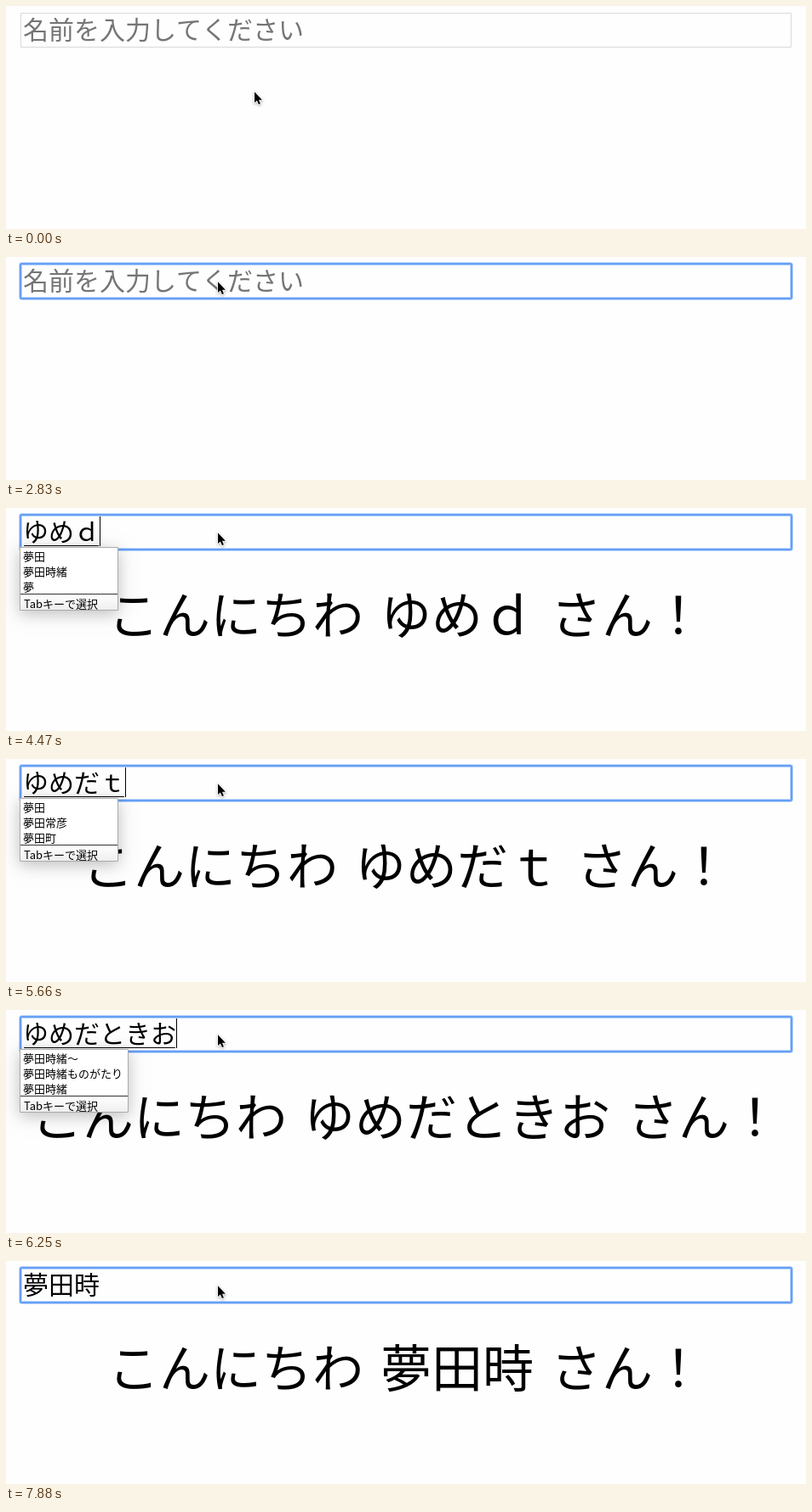
Recreate the animation shown at these times as an HTML page with a canvas. Size 940 by 263 pixels, loop 8 s.

```html
<!DOCTYPE html>
<html lang="ja">
<head>
<meta charset="utf-8">
<style>
html, body { margin: 0; width: 940px; height: 263px; overflow: hidden; background: #fefefe; }
canvas { display: block; }
</style>
</head>
<body>
<canvas id="stage" width="940" height="263"></canvas>
<script>
const ctx = document.getElementById('stage').getContext('2d');
const LOOP = 8000;
const FAMILY = '"Noto Sans CJK JP", "Noto Sans CJK", sans-serif';

// [start time, field text, suggestions]
const typing = [
  [0, ''],
  [3270, 'ｙ'],
  [3420, 'ゆ', ['ゆ']],
  [4170, 'ゆめ', ['夢', '夢田', '夢']],
  [4470, 'ゆめｄ', ['夢田', '夢田時緒', '夢']],
  [4620, 'ゆめだ', ['夢田', '夢田時緒', '夢田町']],
  [5660, 'ゆめだｔ', ['夢田', '夢田常彦', '夢田町']],
  [5810, 'ゆめだと', ['夢田', '夢田時緒', '夢田町']],
  [5960, 'ゆめだとｋ', ['夢田時緒', '夢田時', '夢田']],
  [6100, 'ゆめだとき', ['夢田時緒', '夢田時', '夢田']],
  [6250, 'ゆめだときお', ['夢田時緒〜', '夢田時緒ものがたり', '夢田時緒']],
  [6400, '夢田時緒'],
  [7880, '夢田時']
];
const FOCUS = 1330, COMMIT = 6990;
const caretToggles = [1330, 1780, 2230, 2830, 3270, 4020, 4170, 5070, 5510, 6400, 6990, 7440];
const moveTimes = [290, 440, 590, 740, 890];

const passed = (times, t) => times.filter(start => t >= start).length;

function write(text, x, y, size, color = '#000', weight = 350) {
  ctx.font = `${weight} ${size}px ${FAMILY}`;
  ctx.fillStyle = color;
  ctx.fillText(text, x, y);
}

function outline(x, y, w, h, radius, width, color) {
  ctx.beginPath();
  ctx.roundRect(x, y, w, h, radius);
  ctx.lineWidth = width;
  ctx.strokeStyle = color;
  ctx.stroke();
}

function drawField(t, text) {
  if (t < FOCUS) {
    outline(17.5, 8.5, 905, 40, 0, 1, '#d9d9d9');
  } else {
    outline(17, 8, 906, 41, 2, 4, 'rgba(100,160,250,.45)');
    outline(17, 8, 906, 41, 1.5, 2, '#659ff5');
  }
  write(text || '名前を入力してください', 20, 39, 30, text ? '#000' : '#757575');
  ctx.fillStyle = '#000';
  if (text && t < COMMIT) ctx.fillRect(21, 44, text.length * 30 - 2, 1);
  if (passed(caretToggles, t) % 2) ctx.fillRect(20 + text.length * 30, 10, 1, 35);
}

function drawGreeting(name) {
  const size = 60, gap = 20, baseline = 149, nameWidth = name.length * size;
  const x = 470 - (8 * size + 2 * gap + nameWidth) / 2;
  const nameX = x + 5 * size + gap;
  write('こんにちわ', x, baseline, size);
  write(name, nameX, baseline, size);
  write('さん！', nameX + nameWidth + gap, baseline, size);
}

function drawPopup(rows) {
  const longest = Math.max(...rows.map(row => row.length));
  const w = Math.max(116, longest * 13 + 11);
  const line = 47 + rows.length * 18;
  ctx.save();
  ctx.shadowColor = 'rgba(0,0,0,.25)';
  ctx.shadowBlur = 18;
  ctx.shadowOffsetY = 4;
  ctx.fillStyle = '#fff';
  ctx.fillRect(16, 46, w, line - 26);
  ctx.restore();

  const shade = ctx.createLinearGradient(0, line, 0, line + 20);
  shade.addColorStop(0, '#fff');
  shade.addColorStop(1, '#eee');
  ctx.fillStyle = shade;
  ctx.fillRect(16, line, w, 20);
  outline(16.5, 46.5, w - 1, line - 27, 0, 1, '#aaa');
  ctx.fillStyle = '#333';
  ctx.fillRect(17, line, w - 2, 1);

  rows.forEach((row, i) => write(row, 20, 62 + i * 18, 13));
  if (rows.length === 1) write('ひらがな', 40, 61, 11, '#999');
  write('Tabキーで選択', 21, line + 16.5, 13, '#000', 400);
}

function drawPointer(t) {
  const k = passed(moveTimes, t) / moveTimes.length;
  const ease = k * k * (3 - 2 * k);
  ctx.save();
  ctx.translate(291.5 - 43 * ease, 100.5 - 72 * ease);
  const arrow = new Path2D('M.5 .8V13.6L3.4 10.9L5.4 15.6L7.4 14.7L5.5 10.2H9.4Z');
  ctx.shadowColor = 'rgba(0,0,0,.35)';
  ctx.shadowBlur = 3;
  ctx.shadowOffsetY = 1;
  ctx.lineWidth = 1.6;
  ctx.strokeStyle = '#fff';
  ctx.stroke(arrow);
  ctx.shadowColor = 'transparent';
  ctx.fillStyle = '#000';
  ctx.fill(arrow);
  ctx.restore();
}

function draw(now) {
  const t = now % LOOP;
  const [, text, rows] = typing[passed(typing.map(step => step[0]), t) - 1];
  ctx.fillStyle = '#fefefe';
  ctx.fillRect(0, 0, 940, 263);
  drawField(t, text);
  if (text) drawGreeting(text);
  if (rows) drawPopup(rows);
  drawPointer(t);
}

const begin = performance.now();
function tick() {
  draw(performance.now() - begin);
  requestAnimationFrame(tick);
}
tick();
</script>
</body>
</html>
```
